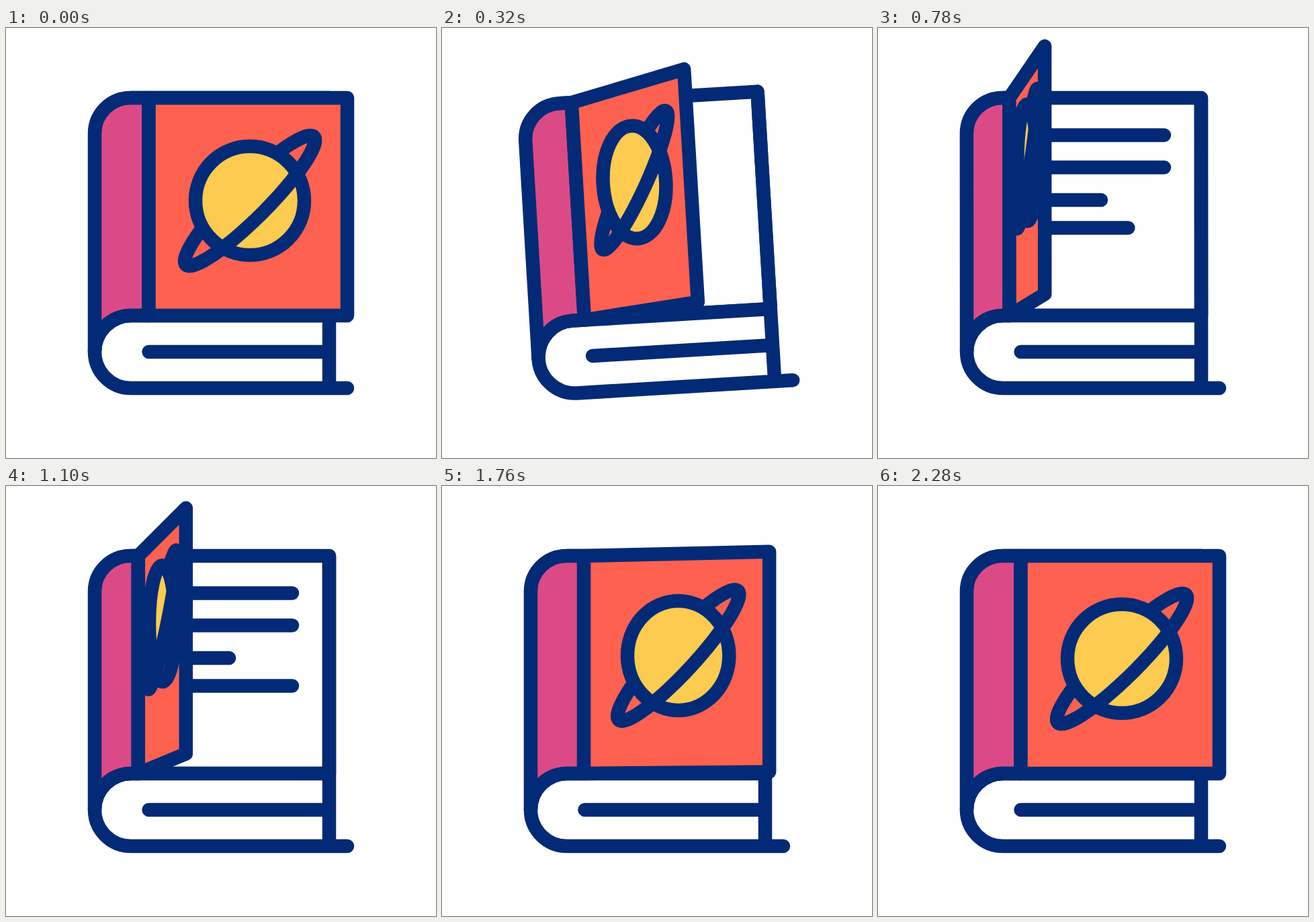
An HTML page for the animation above (2.4 s loop, 640 px wide and 640 px high).

```html
<!DOCTYPE html>
<html lang="en">
<head>
<meta charset="utf-8">
<title>Book</title>
<style>
  html, body { margin: 0; width: 100%; height: 100%; overflow: hidden; background: #fff; }
  svg { display: block; width: 100%; height: 100%; }
  #book { fill: none; stroke: #032a76; stroke-width: 20.5; stroke-linecap: round; stroke-linejoin: round; }
  .paper { fill: #fff; }
  #spine { fill: #db4a86; }
  #cover { fill: #ff6150; }
  #planet { fill: #fccb50; }
</style>
</head>
<body>
<svg viewBox="0 0 640 640">
  <g id="book">
    <path class="paper" d="M186 104H481V428H186Z"/>
    <g id="text"><path/><path/><path/><path/></g>
    <path class="paper" stroke="none" d="M481 428H186A54 54 0 0 0 186 536H481Z"/>
    <path id="spine"/>
    <path d="M481 428H186A54 54 0 0 0 186 536H508M481 104V536M212.5 482H481"/>
    <path id="cover"/>
    <path id="ringBack"/>
    <ellipse id="planet"/>
    <path id="ringFront"/>
  </g>
</svg>
<script>
const LOOP = 2400;
const $ = id => document.getElementById(id);
const set = (el, attrs) => { for (const k in attrs) el.setAttribute(k, attrs[k]); };
const clamp = x => Math.min(1, Math.max(0, x));
const smooth = x => (x = clamp(x), x * x * (3 - 2 * x));

// cubic-bezier(x1, 0, x2, 1)
function ease(x, x1, x2) {
  x = clamp(x);
  let lo = 0, hi = 1;
  for (let i = 0; i < 30; i++) {
    const s = (lo + hi) / 2, r = 1 - s;
    if (3 * x1 * s * r * r + 3 * x2 * s * s * r + s * s * s < x) lo = s; else hi = s;
  }
  return smooth(lo);
}

// How far the cover is open: swing with overshoot, settle, slow close.
function openness(t) {
  const swing = t < 560
    ? 1.065 * ease(t / 560, .75, .46)
    : 1.065 - .06 * smooth((t - 560) / 220);
  return swing * (1 - ease((t - 629) / 1661, .745, .172));
}

const tilt = t => -3.8 * (t < 400 ? smooth(t / 400) : 1 - smooth((t - 400) / 400));

function ringPath(cx, cy, sx, sy, from, to) {
  const pts = [], steps = 90;
  for (let i = 0; i <= steps; i++) {
    const a = from + (to - from) * i / steps;
    const u = 95.2 * Math.cos(a), v = 18.4 * Math.sin(a);
    pts.push((cx + sx * (u + v)).toFixed(2) + ' ' + (cy + sy * (v - u)).toFixed(2));
  }
  return 'M' + pts.join('L');
}

const lines = [[159.5, 426], [207.5, 426], [256, 332], [297.5, 426]];
const lineEls = $('text').children;

function draw(t) {
  const p = openness(t);
  const mix = (a, b) => a + (b - a) * p;
  const hinge = mix(212.5, 195.5), edge = mix(508, 248);

  set($('book'), { transform: `rotate(${tilt(t)} 318 292)` });
  set($('spine'), { d: `M132 482V157A53 53 0 0 1 185 104H${hinge}V428H186A54 54 0 0 0 132 482Z` });
  set($('cover'), { d: `M${hinge} 104L${edge} ${mix(104, 27)}V${mix(428, 396)}L${hinge} 428Z` });

  const cx = mix(363, 222), ringY = mix(257, 194.3);
  const sx = mix(1, .168), sy = mix(1, 1.073);
  set($('planet'), { cx, cy: mix(257, 200.4), rx: mix(81, 14.7), ry: mix(81, 87) });
  set($('ringBack'), { d: ringPath(cx, ringY, sx, sy, 0, 2 * Math.PI) + 'Z' });
  set($('ringFront'), { d: ringPath(cx, ringY, sx, sy, 0, Math.PI) });

  lines.forEach(([y, end], i) => {
    const k = smooth((t - 310 - 100 * i) / 270);
    set(lineEls[i], { d: k > 0 ? `M250 ${y}H${250 + (end - 250) * k}` : '' });
  });
}

const start = performance.now();
function tick() {
  draw((performance.now() - start) % LOOP);
  requestAnimationFrame(tick);
}
tick();
</script>
</body>
</html>
```
